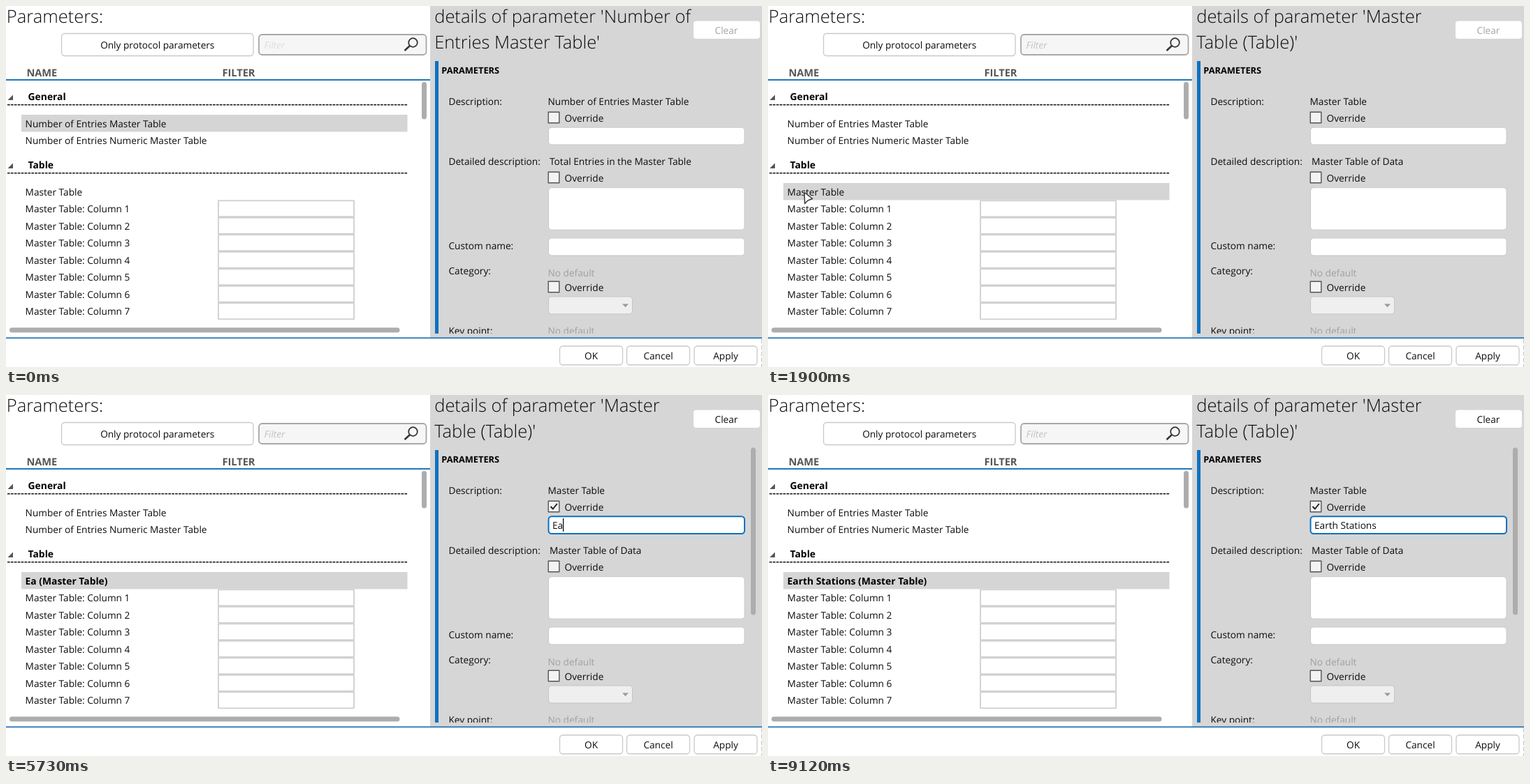
These frames come from a looping animation (1082x518 px, 9270 ms). An HTML page with a canvas:

```html
<!DOCTYPE html>
<html lang="en">
<head>
<meta charset="utf-8">
<title>Parameter override</title>
<style>
html, body { margin: 0; width: 100%; height: 100%; overflow: hidden; background: #fff; }
canvas { display: block; }
</style>
</head>
<body>
<canvas id="stage" width="1082" height="518"></canvas>
<script>
const ctx = document.getElementById('stage').getContext('2d');
ctx.textRendering = 'geometricPrecision';

const LOOP = 9270;
const INK = '#0c0c0c', BLUE = '#0d72c0', PANEL = '#d6d6d6', SCROLL = '#adadad';
const FAMILY = '"Open Sans", "Noto Sans", sans-serif';
const PLAIN = '13.65px ' + FAMILY;
const BOLD = 'bold 13.85px ' + FAMILY;
const TITLE = '300 25.5px ' + FAMILY;

// Left edges of the text columns
const ROW_X = 27.6, LABEL_X = 633.5, VALUE_X = 775.5, TITLE_X = 613.2;

const SELECT = 1050, FILTER_DARKENS = 1450, SCROLLBAR = 2450;
const CHECK = 3280, FOCUS = 4270;
const PHRASE = 'Earth Stations';
const KEY_TIMES = [5260, 5730, 5790, 5950, 6150, 6270, 6420, 6730, 6800, 6940, 7130, 7190, 7320, 7380];
const CARET_SPANS = [[4330, 4890], [5260, 8060], [8590, 9120]];

// Pointer path: time, x, y
const PATH = [
  [60, 600, 15], [130, 555, 30], [240, 380, 78], [350, 190, 150], [470, 79, 211],
  [600, 52, 246], [790, 42, 269], [1840, 42, 269], [1900, 51, 267], [2000, 110, 268],
  [2200, 330, 262], [2400, 575, 240], [2600, 715, 192], [2820, 777, 157], [2880, 779, 157],
  [3280, 779, 157], [3430, 770, 148], [3600, 783, 168], [3800, 808, 186], [5260, 808, 186]
];

function pointerAt(t) {
  const next = PATH.findIndex(p => p[0] > t);
  if (next < 1) return null;
  const [t0, x0, y0] = PATH[next - 1], [t1, x1, y1] = PATH[next];
  const k = (t - t0) / (t1 - t0);
  return { x: x0 + (x1 - x0) * k, y: y0 + (y1 - y0) * k };
}

function rect(x, y, w, h, color) {
  ctx.fillStyle = color;
  ctx.fillRect(x, y, w, h);
}

function box(x, y, w, h, radius, fill, border, lineWidth = 1) {
  ctx.beginPath();
  ctx.roundRect(x, y, w, h, radius);
  ctx.fillStyle = fill;
  ctx.fill();
  if (!border) return;
  ctx.strokeStyle = border;
  ctx.lineWidth = lineWidth;
  ctx.stroke();
}

// Text is placed by the middle of its capitals.
function label(str, x, middle, color = INK, font = PLAIN, align = 'left') {
  ctx.font = font;
  ctx.textAlign = align;
  ctx.fillStyle = color;
  ctx.fillText(str, x, middle + 5);
}

function title(str, x, baseline) {
  ctx.font = TITLE;
  ctx.textAlign = 'left';
  ctx.fillStyle = INK;
  ctx.fillText(str, x, baseline);
}

function polygon(points, fill, stroke, lineWidth) {
  ctx.beginPath();
  points.forEach(([x, y]) => ctx.lineTo(x, y));
  ctx.closePath();
  ctx.fillStyle = fill;
  ctx.fill();
  if (!stroke) return;
  ctx.lineJoin = 'round';
  ctx.strokeStyle = stroke;
  ctx.lineWidth = lineWidth;
  ctx.stroke();
}

function line(points, color, lineWidth, dash = []) {
  ctx.beginPath();
  points.forEach(([x, y]) => ctx.lineTo(x, y));
  ctx.setLineDash(dash);
  ctx.strokeStyle = color;
  ctx.lineWidth = lineWidth;
  ctx.stroke();
  ctx.setLineDash([]);
}

function button(str, x, y, w, h, color = INK) {
  box(x, y, w, h, 4.5, '#fff', '#c9c9c9', 1.3);
  label(str, x + w / 2, y + h / 2 + 0.5, color, PLAIN, 'center');
}

function group(name, middle) {
  polygon([[2.5, middle + 5], [10, middle - 2.5], [10, middle + 5]], '#555');
  label(name, 31.6, middle, '#000', BOLD);
  line([[2, middle + 11.7], [575, middle + 11.7]], '#111', 1.6, [3.7, 1.2]);
}

function override(top, checked, hovered) {
  box(776.2, top + 0.2, 15.6, 15.6, 0, '#f3f3f3', hovered ? '#111' : '#555', hovered ? 2 : 1.4);
  if (checked) line([[779.5, top + 8], [782.8, top + 11.5], [788.8, top + 4]], '#222', 2);
  label('Override', 799.6, top + 8.5);
}

function drawList(t, typed, pointer) {
  title('Parameters:', 0.8, 23.5);
  button('Only protocol parameters', 79.5, 39.5, 274.5, 32);

  box(362, 41, 239.5, 29, 4.5, '#f6f6f6', '#a8a8a8', 1.8);
  label('Filter', 369.5, 56, t < FILTER_DARKENS ? '#dedede' : '#c3c3c3', 'italic ' + PLAIN);
  ctx.beginPath();
  ctx.arc(582.5, 52.5, 6.3, 0, 2 * Math.PI);
  ctx.strokeStyle = '#333';
  ctx.lineWidth = 1.8;
  ctx.stroke();
  line([[578, 57], [570.5, 64]], '#333', 2.4);

  const headerFont = 'bold 14.6px ' + FAMILY;
  label('NAME', 29.4, 96, '#555', headerFont);
  label('FILTER', 309.4, 96, '#555', headerFont);
  if (t > 270 && t < 600) rect(299.5, 86, 1, 19, '#ccc');
  rect(0, 105, 607, 2, '#1f78b8');

  const selectedTop = t < SELECT ? 156 : 254;
  if (t < SELECT) {
    if (t > 420 && t < 540) rect(22, 180.5, 552.5, 24, '#e5e5e5');
    if (pointer && pointer.y > 254) rect(22, 254, 552.5, 24, '#e5e5e5');
  }
  rect(22, selectedTop, 552.5, 24.5, '#d5d5d5');

  group('General', 130);
  label('Number of Entries Master Table', ROW_X, 168.7);
  label('Number of Entries Numeric Master Table', ROW_X, 193.2);
  group('Table', 228);
  if (typed) label(`${typed} (Master Table)`, ROW_X, 266.5, '#000', BOLD);
  else label('Master Table', ROW_X, 266.5);

  for (let i = 0; i < 7; i++) {
    const y = 279.3 + i * 24.5;
    label('Master Table: Column ' + (i + 1), ROW_X, y + 11.7);
    ctx.strokeStyle = '#cfcfcf';
    ctx.lineWidth = 1.8;
    ctx.strokeRect(304, y, 194, 23);
  }

  box(595, 109, 7, 53.5, 3.5, SCROLL);
  box(5, 461.5, 558.5, 7, 3.5, SCROLL);
}

function drawDetails(t, typed) {
  const table = t >= SELECT;
  rect(607, 0, 475, 476, PANEL);
  title(`details of parameter '${table ? 'Master' : 'Number of'}`, TITLE_X, 23.5);
  title(table ? "Table (Table)'" : "Entries Master Table'", TITLE_X, 61);
  box(984, 21.5, 95, 25.5, 4, '#fff');
  label('Clear', 1031, 34.7, typed ? INK : '#a3a3a3', PLAIN, 'center');
  rect(614, 79, 5, 391, BLUE);
  label('PARAMETERS', 623.3, 92.3, '#000', 'bold 12.8px ' + FAMILY);

  label('Description:', LABEL_X, 137);
  label(table ? 'Master Table' : 'Number of Entries Master Table', VALUE_X, 137);
  override(152, t >= CHECK, t >= 2820 && t < 3650);
  const focused = t >= FOCUS;
  const fieldBorder = focused ? BLUE : t > 3650 ? '#8a8a8a' : '#c8c8c8';
  box(776.5, 174.2, 280.5, 24.8, 4.5, '#fff', fieldBorder, focused ? 2 : 1);
  label(typed, 782, 187);
  if (CARET_SPANS.some(([on, off]) => t >= on && t < off)) {
    ctx.font = PLAIN;
    rect(782 + Math.round(ctx.measureText(typed).width), 177, 1.2, 19, '#000');
  }

  label('Detailed description:', LABEL_X, 223.3);
  label(table ? 'Master Table of Data' : 'Total Entries in the Master Table', 778, 223.3);
  override(238, false);
  box(776.5, 260.7, 280.5, 60.5, 4.5, '#fff', '#c8c8c8');

  label('Custom name:', LABEL_X, 343.5);
  box(776.5, 333, 280.5, 25, 4.5, '#fff', '#c8c8c8');

  label('Category:', LABEL_X, 380.3);
  label('No default', VALUE_X, 382.5, '#a0a0a0');
  override(395, false);
  box(776.5, 417, 120, 25, 4, '#efefef', '#c4c4c4');
  polygon([[882, 427.5], [891, 427.5], [886.5, 432.3]], '#9a9a9a');

  ctx.save();
  ctx.beginPath();
  ctx.rect(607, 450, 475, 20);
  ctx.clip();
  label('Key point:', LABEL_X, 466.3);
  label('No default', VALUE_X, 466.3, '#a0a0a0');
  ctx.restore();

  if (t >= SCROLLBAR) box(1066, 75.5, 7, 240, 3.5, SCROLL);
}

function drawPointer({ x, y }) {
  if (x > 776 && y > 174) {
    line([[x - 3, y - 8], [x + 3, y - 8]], '#333', 1);
    line([[x, y - 8], [x, y + 8]], '#333', 1);
    line([[x - 3, y + 8], [x + 3, y + 8]], '#333', 1);
    return;
  }
  const arrow = [[0.5, 0.5], [12, 9.5], [5.5, 12], [1, 16.5]];
  polygon(arrow.map(([dx, dy]) => [x + dx, y + dy]), '#fff', '#3a3a3a', 1.5);
}

function draw(t) {
  const typed = PHRASE.slice(0, KEY_TIMES.filter(time => time <= t).length);
  const pointer = pointerAt(t);
  rect(0, 0, 1082, 518, '#fff');
  drawList(t, typed, pointer);
  drawDetails(t, typed);
  rect(0, 475.5, 1082, 1.7, '#1f6fb5');
  line([[1081.5, 478], [1081.5, 518]], '#c4c4c4', 1, [6, 3]);
  button('OK', 792.5, 488, 90, 27);
  button('Cancel', 888.5, 488, 90, 27);
  button('Apply', 985, 488, 90, 27);
  if (pointer) drawPointer(pointer);
}

const start = performance.now();
function tick() {
  draw((performance.now() - start) % LOOP);
  requestAnimationFrame(tick);
}
tick();
</script>
</body>
</html>
```
